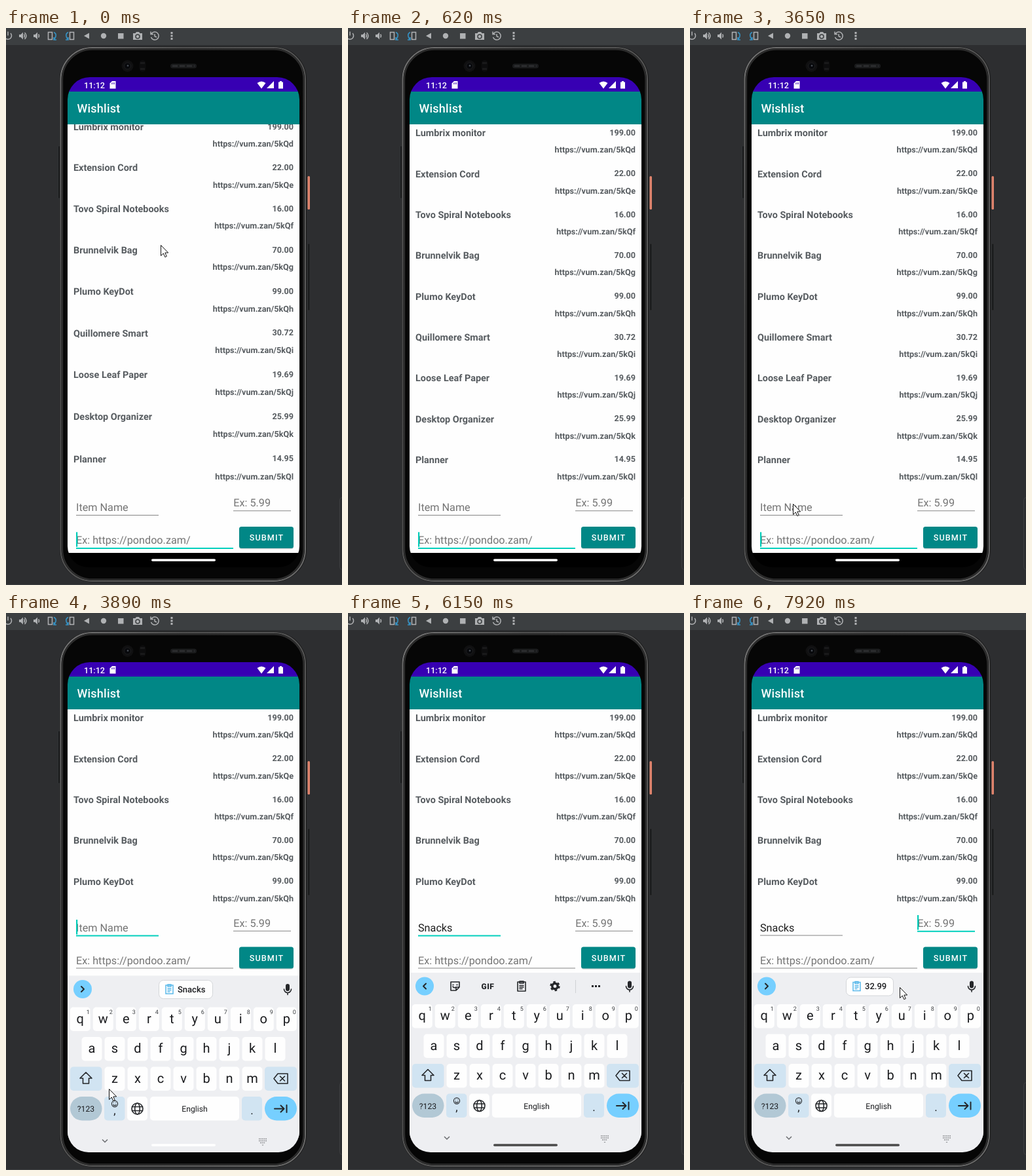
Write an HTML page that moves like this. It is 513 by 850 pixels and loops after 8 s.

```html
<!DOCTYPE html>
<html lang="en">
<head>
<meta charset="utf-8">
<title>Wishlist</title>
<style>
html, body { margin: 0; width: 100%; height: 100%; overflow: hidden; background: #2d2e30; }
svg { display: block; width: 513px; height: 850px; font-family: Roboto, sans-serif; text-rendering: geometricPrecision; }
.bar { fill: #afb1b3; }
.line { fill: none; stroke: #afb1b3; stroke-width: 1.5; }
.blue { fill: none; stroke: #3592c4; stroke-width: 1.6; }
.row { font-weight: 700; font-size: 12.62px; fill: #575c60; text-anchor: end; }
.row.name { font-size: 14.42px; text-anchor: start; }
.field { font-size: 16.22px; fill: #747474; }
.key { font-size: 20px; fill: #1b1c1f; text-anchor: middle; }
.small { font-size: 12.2px; fill: #1b1c1f; text-anchor: middle; }
.sup { font-size: 9px; fill: #3c3f43; text-anchor: middle; }
.ico { fill: none; stroke: #25272a; stroke-width: 1.6; stroke-linejoin: round; stroke-linecap: round; }
.dark { fill: #25272a; }
</style>
</head>
<body>
<svg viewBox="0 0 513 850">
  <defs>
    <linearGradient id="rim" x1="0" y1="0" x2="1" y2="1">
      <stop offset="0" stop-color="#767676"/><stop offset=".25" stop-color="#505050"/>
      <stop offset=".7" stop-color="#5a5a5a"/><stop offset="1" stop-color="#6c6c6c"/>
    </linearGradient>
    <clipPath id="screenClip"><path d="M94 109a34 34 0 0 1 34-34H414a34 34 0 0 1 34 34V791a32 32 0 0 1-32 32H126a32 32 0 0 1-32-32z"/></clipPath>
    <clipPath id="listClip"><rect id="listBox" x="94" y="147" width="354" height="550"/></clipPath>
  </defs>

  <rect width="513" height="850" fill="#2d2e30"/>
  <rect width="513" height="26" fill="#3c3f41"/>
  <rect y="849" width="513" height="1" fill="#3c3f41"/>
  <rect x="509.5" y="716.5" width="10" height="110" rx="4" fill="none" stroke="#3d3e40"/>

  <g id="tools">
    <path class="line" d="M3 5.500v6M-1 8a5.500 5.500 0 1 0 8 0"/>
    <path class="bar" d="M20 10h2.500l3.500-3.500v11l-3.500-3.500h-2.500zM42 10h2.500l3.500-3.500v11l-3.500-3.500h-2.500z"/>
    <path class="line" d="M27.500 9.500q2 2.500 0 5M28.500 7q5 5 0 10M49.500 9.500q2 2.500 0 5"/>
    <path class="line" d="M64.500 6.500h6v11h-6zM97.500 6.500h6v11h-6z"/>
    <path class="blue" d="M73 6.500q4 2 3 6t-3 5M73 14v4h4M95 6.500q-4 2-3 6t3 5M95 14v4h-4"/>
    <path class="bar" d="M119 12l8-4.500v9z"/>
    <circle class="bar" cx="149" cy="12" r="4.200"/>
    <rect class="bar" x="171" y="8" width="8.500" height="8.500"/>
    <path class="bar" d="M194 8h3.500l1.500-2h4l1.500 2h3.500v10h-14z"/>
    <circle cx="201" cy="13" r="3" fill="#afb1b3" stroke="#3c3f41" stroke-width="1.500"/>
    <path class="line" d="M222 9a6 6 0 1 1-.5 5M221 5.500v4h4M227 9v3.500l3 1.500"/>
    <path class="bar" d="M251.500 6h3v3h-3zM251.500 10.500h3v3h-3zM251.500 15h3v3h-3z"/>
  </g>

  <g id="phone">
    <rect x="79.500" y="180" width="3" height="80" rx="1" fill="#191a1b" stroke="#3c3e40" stroke-width=".6"/>
    <rect x="460.500" y="226" width="3.500" height="51" rx="1.500" fill="#df846d"/>
    <rect x="460.500" y="329" width="3.500" height="102" rx="1.500" fill="#1b1c1d" stroke="#38393a" stroke-width=".6"/>
    <rect x="82" y="28.500" width="377" height="817" rx="50" fill="#161616"/>
    <rect x="83.500" y="30" width="373.500" height="814" rx="48.500" fill="#0b0b0b" stroke="url(#rim)" stroke-width="2"/>
    <rect x="86" y="32.500" width="368.500" height="809" rx="46" fill="#060606" stroke="#2c2c2c" stroke-width="2.400"/>
    <circle cx="185.500" cy="58" r="9" fill="#101011"/>
    <circle cx="185.500" cy="58" r="5" fill="#08090c" stroke="#1d1e20"/>
    <circle cx="186" cy="57.500" r="1.300" fill="#4a5058"/>
    <rect x="203.500" y="49" width="10" height="18" rx="5" fill="#0c0c0d"/>
    <path d="M205 53.500h7M205 62.500h7" stroke="#19191a" stroke-width="3"/>
    <rect x="251" y="54.500" width="40" height="7" rx="3.500" fill="#1b1c1d"/>
    <path d="M254 58h34" stroke="#2e2f31" stroke-width="2.500" stroke-dasharray="8 3"/>
  </g>

  <g clip-path="url(#screenClip)">
    <rect x="94" y="75" width="354" height="748" fill="#000"/>
    <rect x="94" y="147" width="354" height="654" fill="#fefefe"/>
    <g id="list" clip-path="url(#listClip)"></g>
    <rect x="94" y="75" width="354" height="23" fill="#3700b3"/>
    <rect x="94" y="97" width="354" height="50" fill="#018786"/>
    <text x="119" y="91.500" font-size="12.620" font-weight="500" fill="#fff">11:12</text>
    <path fill="#fff" d="M162 81h5.500v11.500h-9V84.500z"/>
    <path d="M161.500 83.500v2.500M163.500 83v3M165.500 83v3" stroke="#3700b3" stroke-width=".8"/>
    <path fill="#fff" d="M383.500 84q6.500-5 13 0l-6.500 8.500zM409 81v11h-11zM416 82.500h2v-1.500h3v1.500h2v10h-7z"/>
    <text x="108.400" y="128.800" font-size="18.030" font-weight="500" letter-spacing=".225" fill="#fff">Wishlist</text>

    <g id="form">
      <text id="item" class="field" x="107" y="737.300">Item Name</text>
      <text class="field" x="347.300" y="730.300">Ex: 5.99</text>
      <text class="field" x="107" y="787.300">Ex: https://pondoo.zam/</text>
      <rect id="itemLine" x="107" y="743" width="126"/>
      <rect id="priceLine" x="347" y="736.300" width="88"/>
      <rect id="urlLine" x="107" y="793" width="240"/>
      <rect x="356" y="762.500" width="83" height="33" rx="4" fill="#000" opacity=".14"/>
      <rect x="356" y="761" width="83" height="33" rx="3.500" fill="#018786"/>
      <text x="398" y="782" text-anchor="middle" font-size="12.620" font-weight="500" letter-spacing="1.126" fill="#fff">SUBMIT</text>
      <rect id="caret" width="2.200" height="22.500" fill="#03cdb9"/>
    </g>

    <g id="board">
      <rect x="94" y="549" width="354" height="274" fill="#eeeff2"/>
      <g id="keys"></g>
      <circle cx="117" cy="569.500" r="14" fill="#76cfff"/>
      <path id="arrow" class="ico" style="stroke-width:2"/>
      <path class="dark" d="M427 564.500a3 3 0 0 1 6 0v5a3 3 0 0 1-6 0z"/>
      <path class="ico" d="M424.500 569.500a5.500 5.500 0 0 0 11 0M430 575v3"/>
      <g id="menu">
        <path class="ico" d="M157 563h13v8l-5 5h-8zM165 576v-5h5M160 567.500h1M166 567.500h1M160 570q2 3 5 1"/>
        <text x="213.500" y="574" text-anchor="middle" font-size="12" font-weight="900" letter-spacing=".5" fill="#25272a">GIF</text>
        <path class="ico" d="M259 563h12v14h-12zM262 562h6v3h-6zM262 568.500h6M262 571h6M262 573.500h4"/>
        <circle cx="316" cy="569.500" r="6.200" fill="none" stroke="#25272a" stroke-width="3" stroke-dasharray="3.250 3.243"/>
        <circle cx="316" cy="569.500" r="4.200" fill="none" stroke="#25272a" stroke-width="3.400"/>
        <path d="M347.500 560v20" stroke="#cfd1d4"/>
        <path class="dark" d="M372 568h3v3h-3zM377 568h3v3h-3zM382 568h3v3h-3z"/>
      </g>
      <g id="chip">
        <rect id="chipBox" y="556" height="28" rx="7" fill="#fefefe" stroke="#d4d6d9"/>
        <path id="chipIcon" fill="none" stroke="#5bb9ea" stroke-width="1.500" d="M-5.500-6h11V7h-11zM-2.500-7h5v3h-5zM-3-1h6M-3 1.500h6M-3 4h4"/>
        <text id="chipText" y="574.300" font-size="13" font-weight="500" fill="#1b1c1f"></text>
      </g>
      <path d="M147 799l4 4 4-4" fill="none" stroke="#6c6e71" stroke-width="1.500"/>
      <path d="M386 798h12M386 801h12M388 804h8" stroke="#85878a" stroke-width="1.600" stroke-dasharray="1.600 1"/>
      <path d="M390.500 807h3l-1.500 1.500z" fill="#85878a"/>
    </g>
    <rect id="pill" x="222" y="810.200" width="98" height="3.600" rx="1.800"/>
  </g>

  <path id="mouse" d="M.5.500V16.500L4.300 13l2.500 5.600 2.500-1.100L6.800 12H11.700z" fill="#fff" stroke="#111" stroke-width="1"/>
</svg>

<script>
const LOOP = 8000, PITCH = 62.3, LIFT = -251.5;
const $ = id => document.getElementById(id);
const set = (el, attrs) => { for (const k in attrs) el.setAttribute(k, attrs[k]); };
const show = (el, on) => { el.style.display = on ? '' : 'none'; };
const hold = (steps, t) => steps.filter(s => s[0] <= t).pop();

const goods = [
  ['Lumbrix monitor', '199.00'], ['Extension Cord', '22.00'], ['Tovo Spiral Notebooks', '16.00'],
  ['Brunnelvik Bag', '70.00'], ['Plumo KeyDot', '99.00'], ['Quillomere Smart', '30.72'],
  ['Loose Leaf Paper', '19.69'], ['Desktop Organizer', '25.99'], ['Planner', '14.95']
];

const labels = [];
function label(cls, x, y, text) {
  const el = document.createElementNS('http://www.w3.org/2000/svg', 'text');
  set(el, { class: cls, x });
  el.textContent = text;
  $('list').append(el);
  labels.push({ el, y });
}
goods.forEach(([name, price], i) => {
  const y = 165.4 + PITCH * i;
  label('row name', 103, y, name);
  label('row', 439, y - 1.4, price);
  label('row', 439, y + 25, 'https://vum.zan/5kQ' + 'defghijkl'[i]);
});

function buildKeys() {
  const rowY = r => 597 + 45.5 * r;
  const cap = (x, r, w, fill = '#fefefe', rx = 5) =>
    `<rect x="${x}" y="${rowY(r)}" width="${w}" height="36.5" rx="${rx}" fill="${fill}"/>`;
  const tint = '#d1e4f2';
  let out = '';
  [['qwertyuiop', 113.3], ['asdfghjkl', 131], ['zxcvbnm', 166]].forEach(([chars, x0], r) => {
    [...chars].forEach((c, i) => {
      const x = x0 + 35 * i;
      out += cap(x - 15.5, r, 31) + `<text class="key" x="${x}" y="${rowY(r) + 24.3}">${c}</text>`;
      if (!r) out += `<text class="sup" x="${x + 12}" y="607">${(i + 1) % 10}</text>`;
    });
  });
  out += cap(98, 2, 48.5, tint) + cap(395, 2, 49, tint);
  out += cap(98, 3, 48.5, '#b2c8d5', 18.2) + cap(150, 3, 31.5, tint) + cap(185, 3, 31);
  out += cap(220, 3, 136) + cap(360, 3, 31, tint) + cap(395, 3, 49, '#76cfff', 18.2);
  out += `<text class="small" x="122" y="756.500">?123</text><text class="small" x="288" y="756.500">English</text>
    <text class="key" style="font-size:17px" x="166" y="760">,</text><text class="key" style="font-size:17px" x="375.500" y="760">.</text>
    <path class="ico" d="M122 696.500l9 9h-4.500v8h-9v-8H113z"/>
    <path class="ico" d="M415 698.500h15v15h-15l-6-7.500zM418.500 702.500l7 7M425.500 702.500l-7 7"/>
    <circle class="ico" cx="166" cy="744.500" r="4.600" style="stroke-width:1.100"/>
    <path class="ico" d="M164.300 743h.1M167.700 743h.1M163.700 746q2.300 2 4.600 0" style="stroke-width:1.200"/>
    <circle class="ico" cx="200.500" cy="752" r="8.500"/><ellipse class="ico" cx="200.500" cy="752" rx="3.800" ry="8.500"/>
    <path class="ico" d="M192.500 749h16M192.500 755h16"/>
    <path class="ico" style="stroke-width:2" d="M410 752h14M419.500 747l5 5-5 5M428.500 746.500v11"/>`;
  $('keys').innerHTML = out;
}
buildKeys();

// Each step is [start ms, values...]; a step without values hides the thing.
const mouseSteps = [
  [0, 236, 331], [120, 236, 323], [240, 235, 315], [360, 229, 331], [480, 220, 347], [620],
  [3130, 28, 819], [3250, 96, 772], [3370, 140, 738], [3490, 157, 726],
  [4270, 177, 698], [4390, 226, 630], [4510, 268, 577], [4630, 275, 573], [4870],
  [6960, 275, 573], [7080, 302, 552], [7200, 345, 512], [7320, 380, 485], [7440, 392, 479],
  [7800, 358, 527], [7920, 320, 571]
];
const spots = { url: [107, 769.3], item: [107, 719.5], typed: [159.5, 719.5], price: [347, 712.5] };
const caretSteps = [
  [0, 'url'], [120], [620, 'url'], [1150], [1590, 'url'], [2140], [2700, 'url'], [3130], [3650, 'url'],
  [3770, 'item'], [4270], [4630, 'typed'], [5110], [5620, 'typed'], [6150], [6680, 'typed'], [7200], [7440, 'price']
];
const focusSteps = [[0, 'url'], [3770, 'item'], [7440, 'price']];
const stretchSteps = [[0, 9.5], [120, 4], [240, 1.4], [360, 0.5], [480, 0]];
const slideSteps = [[0, 270], [3770, 90], [3890, 4.5], [4010, 0]];
const pillSteps = [[0, 255], [4870, 238], [5110, 190], [5230, 150], [5500, 95], [5620, 74]];

function draw(t) {
  const up = t >= 3770, typed = t >= 4630;
  const menuOpen = typed && t < 7440;

  const pull = hold(stretchSteps, t)[1];
  for (const { el, y } of labels) {
    const u = Math.min(1, (y - 152) / 545);
    el.setAttribute('y', y - pull * (1 - u * u));
  }
  set($('listBox'), { height: up ? 550 + LIFT : 550 });

  set($('form'), { transform: `translate(0 ${up ? LIFT : 0})` });
  $('item').textContent = typed ? 'Snacks' : 'Item Name';
  $('item').style.fill = typed ? '#1d1d1d' : '';
  const focus = hold(focusSteps, t)[1];
  for (const f of ['item', 'price', 'url']) {
    const on = f === focus;
    set($(f + 'Line'), { height: on ? 2 : 1, fill: on ? '#03d0bd' : '#858585' });
  }
  const spot = spots[hold(caretSteps, t)[1]];
  show($('caret'), spot);
  if (spot) set($('caret'), { x: spot[0], y: spot[1] });

  show($('board'), up);
  set($('board'), { transform: `translate(0 ${hold(slideSteps, t)[1]})` });
  show($('menu'), menuOpen);
  show($('chip'), !menuOpen);
  set($('arrow'), { d: menuOpen ? 'M119 565.500l-4 4 4 4' : 'M115 565.500l4 4-4 4' });
  const [word, left, width] = typed ? ['32.99', 238.5, 72] : ['Snacks', 233.5, 82];
  set($('chipBox'), { x: left, width });
  set($('chipIcon'), { transform: `translate(${left + 16} 569.500)` });
  set($('chipText'), { x: left + 28.5 });
  $('chipText').textContent = word;

  const tone = hold(pillSteps, t)[1];
  set($('pill'), { fill: `rgb(${tone},${tone},${tone})` });

  const [, x, y] = hold(mouseSteps, t);
  show($('mouse'), x !== undefined);
  if (x !== undefined) set($('mouse'), { transform: `translate(${x} ${y})` });
}

const start = performance.now();
function tick() {
  draw((performance.now() - start) % LOOP);
  requestAnimationFrame(tick);
}
tick();
</script>
</body>
</html>
```
